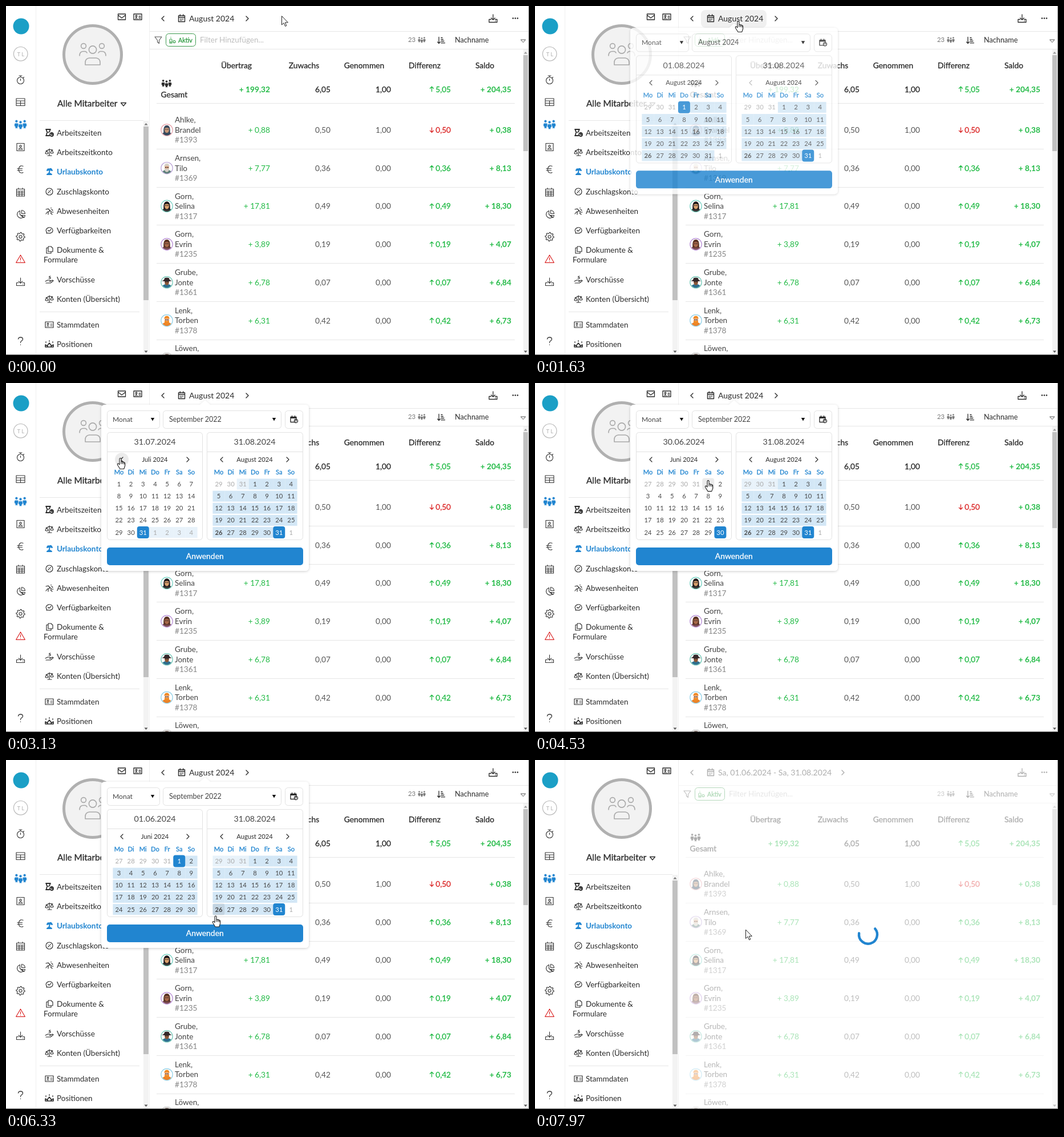
An HTML page for the animation above (8000 ms loop, 917x611 px).

```html
<!DOCTYPE html>
<html lang="de">
<head>
<meta charset="utf-8">
<title>Urlaubskonto</title>
<style>
html, body { margin: 0; width: 100%; height: 100%; overflow: hidden; background: #fff; }
svg { display: block; width: 917px; height: 611px; font-family: Lato, "Open Sans", sans-serif; }
text { white-space: pre; }
</style>
</head>
<body>
<svg id="stage" viewBox="0 0 917 611"></svg>
<script>
const BLUE = '#2185d0', GREEN = '#21ba45', RED = '#db2828', INK = '#2b2b2b', LINE = '#3a3a3a';

// ---- drawing helpers (return SVG markup) ----
function text(x, y, str, size, fill = INK, o = {}) {
  const medium = o.medium ? ` stroke="${fill}" stroke-width=".3"` : '';
  return `<text x="${x}" y="${y}" font-size="${size}" fill="${fill}" font-weight="${o.bold ? 700 : 400}" text-anchor="${o.anchor || 'start'}"${medium}>${str}</text>`;
}
const rect = (x, y, w, h, fill, rx = 0, stroke = 'none') =>
  `<rect x="${x}" y="${y}" width="${w}" height="${h}" rx="${rx}" fill="${fill}" stroke="${stroke}"/>`;
const circle = (x, y, r, fill, stroke = 'none', w = 1) =>
  `<circle cx="${x}" cy="${y}" r="${r}" fill="${fill}" stroke="${stroke}" stroke-width="${w}"/>`;
const icon = (x, y, d, color = LINE, w = 1.15, fill = 'none') =>
  `<path transform="translate(${x} ${y})" d="${d}" fill="${fill}" stroke="${color}" stroke-width="${w}" stroke-linecap="round" stroke-linejoin="round"/>`;
const solid = (x, y, d, color = INK) => icon(x, y, d, 'none', 0, color);
const hline = (x1, x2, y, color = '#e6e6e6') => rect(x1, y, x2 - x1, 1, color);
const group = (id, body, extra = '') => `<g id="${id}" ${extra}>${body}</g>`;
const ring = r => `M${-r} 0A${r} ${r} 0 1 1 ${r} 0A${r} ${r} 0 1 1 ${-r} 0Z`;

const CARD = 'M-7 -5H7V5H-7ZM-4 3Q-3 0 -1 3M2 -1H5M2 2H5' + 'M-3.8 -1.5A1.2 1.2 0 1 1 -1.2 -1.5A1.2 1.2 0 1 1 -3.8 -1.5Z';
const ENVELOPE = 'M-6.5 -5H6.5V5H-6.5ZM-6.5 -3L0 2L6.5 -3';
const GRID = 'M-7.5 -6H7.5V6.5H-7.5ZM-7.5 -2H7.5M-7.5 2.2H7.5M0 -2V6.5';
const DOWNLOAD = 'M0 -7V2M-3.3 -1L0 2.3L3.3 -1M-3.5 1.5H-7V6.5H7V1.5H3.5M4 4.2H4.5';
const CALENDAR = 'M-5.5 -4.5H5.5V6H-5.5ZM-5.5 -1.5H5.5M-2.7 -6.5V-4M2.7 -6.5V-4M-2.5 1.5H-2M0 1.5H.3M2 1.5H2.5M-2.5 3.8H-2M0 3.8H.3';
const SCALES = 'M-6 -2L0 -5L6 -4M0 -6V6M-3 6H4M-7 2L-4.5 -3L-2 2Q-4.5 4 -7 2ZM2 1L4.5 -4L7 1Q4.5 3 2 1Z';
const DROP = 'M-4.5 -2.5H4.5L0 3Z', CARET = 'M-3.2 -2.5H3.2L0 3Z';
const LEFT = 'M2 -4L-2 0L2 4', RIGHT = 'M-2 -4L2 0L-2 4';

// three standing figures, the middle one in front
function people(x, y, color, s = 1) {
  const one = (dx, dy) => `<g transform="translate(${dx} ${dy})"><circle cy="-4.8" r="2.2"/>`
    + `<path d="M-1.5 -2H1.5Q3.3 -2 3.3 0V2.2Q3.3 3.2 2 3.4V6H-2V3.4Q-3.3 3.2 -3.3 2.2V0Q-3.3 -2 -1.5 -2Z"/></g>`;
  return `<g transform="translate(${x} ${y}) scale(${s})" fill="${color}" stroke="#fff" stroke-width=".7">${one(-6.2, -.6)}${one(6.2, -.6)}${one(0, .8)}</g>`;
}

// ---- left rail and sidebar ----
function rail() {
  let gear = '';
  for (let i = 0; i < 32; i++) {
    const r = i % 4 < 2 ? 7.6 : 5.8, a = i / 32 * 2 * Math.PI;
    gear += (i ? 'L' : 'M') + (r * Math.cos(a)).toFixed(1) + ' ' + (r * Math.sin(a)).toFixed(1);
  }
  return rect(52, 0, 1, 611, '#f0f0f0') + circle(26.5, 35.5, 14, '#1b9fc6')
    + circle(25.7, 83.8, 12.3, '#fff', '#b9b9b9', 1.2) + text(25.7, 87.5, 'T L', 9.5, '#b4b4b4', { anchor: 'middle' })
    + icon(25.5, 130.5, ring(6) + 'M0 -3V0M-2.5 -8.5H2.5M0 -8V-6M5 -5L6 -6')
    + icon(25.5, 168, GRID) + people(25.5, 208, BLUE, 1.15)
    + icon(25.5, 247, 'M-6.5 -6.5H6.5V6.5H-6.5ZM-3.5 4Q0 -1 3.5 4ZM-1.7 -1.7A1.7 1.7 0 1 1 1.7 -1.7A1.7 1.7 0 1 1 -1.7 -1.7Z')
    + icon(25.5, 286, 'M4.5 -5.5Q-1 -8 -3 -2Q-4 3 -1 5.5Q2 7 4.5 5.5M-5.5 -1.5H3M-5.5 1.5H3')
    + icon(25.5, 326, 'M-7 -5.5H7V7H-7ZM-7 -2H7M-7 1H7M-7 4H7M-2.5 -2V7M2.5 -2V7M-3.5 -7.5V-5.5M3.5 -7.5V-5.5')
    + icon(25.5, 365, 'M-1 -6.5A6.5 6.5 0 1 0 4.5 5L-1 0ZM2 -7.5A7 7 0 0 1 8 -1.5H2ZM2 1.5H8A7 7 0 0 1 6 5.5Z')
    + icon(25.5, 404, gear + 'Z') + icon(25.5, 404, ring(2.5))
    + icon(25.5, 443, 'M0 -7L7.8 6.3H-7.8ZM0 -2.5V1.5M0 3.9V4', RED, 1.2)
    + icon(25.5, 483, DOWNLOAD)
    + icon(25.5, 587, 'M-4 -4Q-3.5 -7 0 -7Q4 -7 4 -3.7Q4 -1.8 1.8 -.7Q0 .3 0 2.5M0 6V6.2', LINE, 1.3);
}

const MENU = [
  [222, 'Arbeitszeiten', 'M-6 -6H2M-6 5H0M-5 -6V-4Q-5 -2 -3 -1Q-5 0 -5 5M1 -6V-4Q1 -2 -1 -1M1 3A3 3 0 1 1 7 3A3 3 0 1 1 1 3ZM4 1.5V3H5', 1.8],
  [256, 'Arbeitszeitkonto', SCALES],
  [290, 'Urlaubskonto', 'M-4 -2Q-3 -6 0 -4Q3 -7 5 -2L0 -3.5ZM0 -3.5Q1 1 -1 3M-4 5H4Q0 1 -4 5Z', 2],
  [325, 'Zuschlagskonto', ring(6) + 'M-2.3 2.3L2.3 -2.3M-2 -2H-1.8M2 2H1.8'],
  [359, 'Abwesenheiten', 'M-6 -3L-2 -4L1 -1L-2 2V6M1 -1L4 2H7M-3 1L-6 5M3 -6V-5M4 -3L6 -1M2 3L5 6'],
  [393, 'Verfügbarkeiten', 'M-5 5L-4.5 3A6 5 0 1 1 -2 4.5ZM-2.5 -.5L-.5 1.3L3 -2'],
  [427, 'Dokumente &amp;', 'M-2 -6H3L6 -3V3H-2ZM-2 -3.5H-5V6H3V3'],
  [479, 'Vorschüsse', 'M-7 3L-3 1H1Q3 3 0 3.5M-6 6H2L7 2Q5 0 2 3M2 -6Q-1 -6 0 -4Q3 -4 2 -2H-1'],
  [513, 'Konten (Übersicht)', SCALES],
  [558, 'Stammdaten', CARD],
  [592, 'Positionen', 'M-6 -4V-3M0 -6V-5M6 -4V-3M-7 5V1L-4 3L0 -2L4 3L7 1V5ZM-3 5V3M3 5V3', 1.6]
];

function sidebar() {
  const grey = '#a9a9a9';
  let s = icon(203, 19, ENVELOPE, INK, 1.3) + icon(231, 19, CARD, INK, 1.3)
    + circle(152, 85, 50.5, '#f2f2f2', '#b0b0b0', 5)
    + circle(152, 76.5, 6.6, 'none', grey, 1.6)
    + icon(152, 85, 'M-13 18V14Q-13 7 -6 6H6Q13 7 13 14V18Z', grey, 1.6)
    + [-1, 1].map(k => circle(152 + 16 * k, 70, 4.4, 'none', grey, 1.6)
      + icon(152, 85, `M${23 * k} 2Q${23 * k} -5 ${17 * k} -5.5H${13 * k}Q${11 * k} -5 ${10 * k} -3`, grey, 1.6)).join('')
    + text(90, 176, 'Alle Mitarbeiter', 15.3, INK, { medium: 1 })
    + icon(206, 172, DROP, INK, 1.3)
    + hline(59, 241, 200);
  for (const [y, label, d, w] of MENU) {
    const on = label === 'Urlaubskonto', c = on ? BLUE : INK;
    s += icon(76, y, d, c, w || 1.15) + text(89, y + 5, label, 13.5, c, { bold: on });
  }
  return s + text(66, 449, 'Formulare', 13.5) + hline(59, 234, 535)
    + rect(241, 201, 9, 409, '#f3f3f3') + rect(241, 211, 9, 304, '#c1c1c1')
    + solid(245.5, 207, 'M-3 1.5H3L0 -2Z', '#777') + solid(245.5, 605, 'M-3 -1.5H3L0 2Z', '#555')
    + rect(251, 0, 1, 611, '#f0f0f0');
}

// ---- table ----
const STAFF = [
  ['Ahlke,', 'Brandel', 1393, '0,88', '0,50', '1,00', '-0,50', '0,38'],
  ['Arnsen,', 'Tilo', 1369, '7,77', '0,36', '0,00', '0,36', '8,13'],
  ['Gorn,', 'Selina', 1317, '17,81', '0,49', '0,00', '0,49', '18,30'],
  ['Gorn,', 'Evrin', 1235, '3,89', '0,19', '0,00', '0,19', '4,07'],
  ['Grube,', 'Jonte', 1361, '6,78', '0,07', '0,00', '0,07', '6,84'],
  ['Lenk,', 'Torben', 1378, '6,31', '0,42', '0,00', '0,42', '6,73'],
  ['Löwen,', '', '', '', '', '', '', '']
];
// ring, hair, skin, clothes, style
const FACES = [
  ['#e8a0a8', '#3c4a5c', '#c99878', '#34495e', 'long'],
  ['#b9a3d6', '#d5d0c6', '#e0ac8a', '#5d7f7a', 'beard'],
  ['#6fd0c0', '#1f1a1c', '#d9a06c', '#3a3a3a', 'long'],
  ['#b58ad6', '#5a3325', '#a8694a', '#7a4a52', 'long'],
  ['#6fc7b5', '#33282a', '#8a5638', '#2d6f8e', 'hat'],
  ['#8fd0e8', '#f08a24', '#e8b088', '#e9812a', 'beard'],
  ['#c9c9c9', '#4a3026', '#8a5a3c', '#555', 'hat']
];

function face(y, [edge, hair, skin, cloth, style]) {
  let s = circle(282, y, 10.2, '#fff', edge, 1.2) + solid(282, y, 'M-7.5 6Q-5 3 0 3T7.5 6Q4 9.7 0 9.7T-7.5 6Z', cloth);
  if (style === 'long') s += solid(282, y, 'M-5.5 6Q-7 -8 0 -8T5.5 6Z', hair);
  s += solid(282, y, 'M-3.8 -3Q-4 -6 0 -6T3.8 -3V1Q3 5 0 5T-3.8 1Z', skin);
  if (style === 'beard') s += solid(282, y, 'M-4.2 0Q0 2 4.2 0Q4 7 0 7T-4.2 0Z', hair);
  s += style === 'hat' ? solid(282, y, 'M-9 -2.5Q-4 -3.5 -4 -7.5Q0 -9 4 -7.5Q4 -3.5 9 -2.5Q0 -.5 -9 -2.5Z', hair)
    : solid(282, y, 'M-4.5 -2.5Q-4.5 -8 0 -8T4.5 -2.5Q0 -5.5 -4.5 -2.5Z', hair);
  return s + icon(282, y, 'M-2.4 -1H-1M1 -1H2.4', '#2a2226', 1.2);
}

function values(y, [carry, gain, used, diff, saldo], bold) {
  const down = diff[0] === '-', c = down ? RED : GREEN, end = { anchor: 'end' }, strong = { anchor: 'end', bold: 1 };
  const mid = bold ? { anchor: 'end', medium: 1 } : end, grey = bold ? INK : '#555';
  return text(463, y + 5, '+ ' + carry, 13.7, GREEN, bold ? strong : end)
    + text(569, y + 5, gain, 13.7, grey, mid) + text(675, y + 5, used, 13.7, grey, mid)
    + text(780, y + 5, diff.replace('-', ''), 13.6, c, { anchor: 'end', medium: 1 })
    + icon(746.5, y, down ? 'M0 -4.2V4.2M-3 1.2L0 4.2L3 1.2' : 'M0 4.2V-4.2M-3 -1.2L0 -4.2L3 -1.2', c, 1.3)
    + text(886, y + 5, '+ ' + saldo, 13.7, GREEN, strong);
}

function main() {
  let s = group('pill', rect(291, 7, 115, 31, '#f0f0f0', 8))
    + icon(275, 22, LEFT, INK, 1.4) + icon(308, 21.5, CALENDAR, INK, 1.4)
    + group('titleMonth', text(321, 26.8, 'August 2024', 14) + icon(423, 22, RIGHT, INK, 1.4))
    + group('titleRange', text(321, 26.8, 'Sa, 01.06.2024 - Sa, 31.08.2024', 14.1) + icon(540, 22, RIGHT, INK, 1.4))
    + icon(854, 22, DOWNLOAD, INK, 1.3) + [-4, 0, 4].map(d => circle(893 + d, 21.5, 1.3, INK)).join('')
    + hline(252, 917, 44)
    + icon(267, 59.5, 'M-6 -5.5H6L1.5 .5V6L-1.5 3.5V.5Z', '#555', 1.1)
    + rect(280.5, 48.5, 52, 22, '#fff', 5, '#3c9a4e')
    + icon(292, 60, 'M-3 -5.5V-5M-5 5V-1Q-3 -4 -1 -1V5ZM-3 2V5M1 2.5A2 2 0 1 1 5 2.5A2 2 0 1 1 1 2.5Z', '#2c9a40', 1.1)
    + text(302, 63.5, 'Aktiv', 10.7, '#2c9a40', { medium: 1 })
    + text(340, 64.3, 'Filter Hinzufügen...', 13.5, '#bdbdbd')
    + text(705, 63.3, '23', 11.3, '#777') + people(729, 59.5, '#777', .72)
    + icon(763, 60, 'M-4 -5.5V5.5M-6.3 3L-4 5.5L-1.7 3M0 -4.5H2M0 -1.5H3.5M0 1.5H5M0 4.7H6.5', INK, 1.3)
    + text(787, 64, 'Nachname', 12.7) + icon(907, 61, 'M-4 -2H4L0 2.5Z', '#555', 1)
    + hline(252, 917, 75);
  const heads = { 'Übertrag': 404, 'Zuwachs': 522.5, 'Genommen': 628, 'Differenz': 734, 'Saldo': 839.5 };
  for (const h in heads) s += text(heads[h], 109, h, 13.8, INK, { anchor: 'middle', medium: 1 });
  s += people(281.5, 136, INK, .95) + text(271.5, 160, 'Gesamt', 13.9, INK, { medium: 1 })
    + values(145.5, ['199,32', '6,05', '1,00', '5,05', '204,35'], true) + hline(264, 892, 170);
  STAFF.forEach(([last, first, no, ...nums], i) => {
    const y = 217 + 66.7 * i;
    s += text(296, y - 12.8, last, 13.5, '#444') + face(y, FACES[i]);
    if (!first) return;
    s += text(296, y + 4.8, first, 13.5, '#444') + text(296, y + 22.3, '#' + no, 13.6, '#858585')
      + values(y, nums) + hline(264, 892, Math.round(y + 33));
  });
  return s + rect(907, 76, 9, 535, '#f3f3f3') + rect(907, 86, 8, 168, '#c1c1c1')
    + solid(911, 82, 'M-3 1.5H3L0 -2Z', '#999') + solid(911, 605, 'M-3 -1.5H3L0 2Z', '#555');
}

// ---- date range popup ----
const MONTHS = ['Juni', 'Juli', 'August'], STEP = 21.15;
const day = (m, d) => Math.round(Date.UTC(2024, m - 1, d) / 864e5);

function monthView(x0, month, from, picked, locked) {
  const mid = { anchor: 'middle' }, cx = x0 + 63, to = day(8, 31);
  const date = new Date(picked * 864e5).toISOString().slice(0, 10).split('-').reverse().join('.');
  let s = text(cx, 108.3, date, 14.3, '#444', mid) + text(cx, 138, MONTHS[month - 6] + ' 2024', 11.2, INK, mid)
    + icon(cx - 58, 134, LEFT, locked ? '#aaa' : INK, 1.2) + icon(cx + 58, 134, RIGHT, INK, 1.2);
  ['Mo', 'Di', 'Mi', 'Do', 'Fr', 'Sa', 'So'].forEach((w, i) => s += text(x0 + STEP * i, 160, w, 11.2, BLUE, { anchor: 'middle', medium: 1 }));
  const first = day(month, 1), start = first - (first + 3) % 7, last = day(month + 1, 1) - 1;
  let labels = '';
  for (let i = 0; i < 35; i++) {
    const n = start + i, x = x0 + STEP * (i % 7), y = 177 + STEP * Math.floor(i / 7);
    const outside = n < first || n > last, on = n === picked;
    if (n >= from && n <= to && !on) s += rect(x - 10.6, y - 9.5, 21.3, 19, outside ? '#e8f2fa' : '#d3e7f6');
    if (on) labels += rect(x - 10.5, y - 10.5, 21, 21, BLUE, 4);
    labels += text(x, y + 4, new Date(n * 864e5).getUTCDate(), 11.3, on ? '#fff' : outside ? '#aaa' : '#484848',
      { anchor: 'middle', bold: n === day(8, 26) });
  }
  return s + labels;
}

// time, month, first day of the range
const VIEWS = [[0, 8, 1], [3130, 7, 31], [3600, 6, 30], [5170, 6, 1]];

function popup() {
  const edge = '#e2e2e2';
  const box = (x, y, w, h) => rect(x, y, w, h, '#fff', 5, edge);
  let s = `<g filter="url(#shadow)">${rect(167, 38, 364, 291, '#fff', 6)}<path d="M340 38.5L349 30L358 38.5Z" fill="#fff"/></g>`
    + group('selects', box(177.5, 48.5, 92, 31) + text(187, 68, 'Monat', 12.1, '#444') + solid(257, 63.5, CARET, '#111')
      + box(275.5, 48.5, 207, 31) + solid(470, 63.5, CARET, '#111')
      + group('optOld', text(286, 68, 'August 2024', 12.6, '#444')) + group('optNew', text(286, 68, 'September 2022', 12.5, '#444'))
      + box(489.5, 48.5, 31, 31) + icon(504.5, 64, 'M1 4.5H-5.5V-4.5H4.5V-1M-3 -6.5V-4.5M2 -6.5V-4.5M1 2.5A3 3 0 1 1 7 2.5A3 3 0 1 1 1 2.5ZM4 1V2.7', INK, 1.4)
      + rect(499, 59.5, 10, 2.5, INK))
    + group('selectAny', box(177.5, 48.5, 343, 31) + text(187, 68, 'Beliebig', 12.2, '#444') + solid(501, 63.5, CARET, '#111'))
    + box(177.5, 86.5, 167, 188) + box(352.5, 86.5, 168, 188) + hline(178, 344, 120, edge) + hline(353, 520, 120, edge);
  VIEWS.forEach(([, m, d], i) => {
    const from = day(m, d);
    s += group('view' + i, monthView(198, m, from, from) + monthView(373, 8, from, day(8, 31), i === 0));
  });
  return s + group('hoverCell', rect(-10.5, -10.5, 21, 21, '#000', 4), 'opacity=".08"')
    + group('hoverPrev', circle(203, 134, 12, '#000'), 'opacity=".08"')
    + rect(177, 288, 344, 31, BLUE, 5) + group('hoverApply', rect(177, 288, 344, 31, '#1e7ec8', 5))
    + text(348.8, 308.4, 'Anwenden', 13.9, '#fff', { anchor: 'middle', medium: 1 });
}

const ARROW = 'M.5 .5V15.5L4 12.2L6.6 18L8.8 17L6.4 11.4H11Z';
const HAND = 'M-1 1.7Q.5 -.7 2 1.7V7Q3.5 6 4.6 7.4Q6.2 6.6 7 8.2Q8.6 7.8 8.6 9.8V14L6.7 19.5H0L-4 13.2Q-5.4 10.7 -3.8 10.1Q-2.4 9.8 -1 12ZM2 7V10.5M4.6 7.5V10.5M7 8.5V11';

document.getElementById('stage').innerHTML =
  '<defs><filter id="shadow" x="-5%" y="-5%" width="110%" height="112%"><feDropShadow dx="0" dy="1" stdDeviation="2.2" flood-color="#000" flood-opacity=".2"/></filter></defs>'
  + rail() + sidebar() + main() + group('popup', popup())
  + group('veil', rect(252, 0, 665, 611, '#fff'))
  + `<path id="spinner" fill="none" stroke="${BLUE}" stroke-width="4.4" stroke-linecap="round"/>`
  + rect(0, 610, 917, 1, '#6b6b6b') + rect(916, 0, 1, 611, '#8a8a8a')
  + group('cursor', group('arrow', icon(0, 0, ARROW, '#222', 1, '#fff')) + group('hand', icon(0, 0, HAND, '#222', 1.1, '#fff')));

// ---- motion ----
const $ = id => document.getElementById(id);
const show = (id, on) => $(id).setAttribute('display', on ? 'inline' : 'none');
const fade = (id, v) => $(id).setAttribute('opacity', v);
const ramp = (t, a, b) => Math.min(1, Math.max(0, (t - a) / (b - a)));
const inOut = p => p * p * (3 - 2 * p), out = p => 1 - (1 - p) ** 2, linear = p => p;

// time, x, y, easing towards this point
const PATH = [
  [230, 483, 17.5], [1030, 356, 26, inOut], [2130, 356, 26], [2900, 200, 131, inOut],
  [4070, 200, 131], [4530, 303, 170, inOut], [4630, 308, 173, out], [4770, 308, 173],
  [4970, 306, 174, linear], [5930, 306, 174], [6330, 367, 272.5, inOut], [6730, 369, 297, inOut]
];

function pointer(t) {
  let a = PATH[0];
  for (const b of PATH) {
    if (t < b[0]) {
      const p = (b[3] || linear)(ramp(t, a[0], b[0]));
      return [a[1] + (b[1] - a[1]) * p, a[2] + (b[2] - a[2]) * p];
    }
    a = b;
  }
  return [a[1], a[2]];
}

function hoveredCell(x, y) {
  const x0 = x < 350 ? 198 : 373;
  const col = Math.floor((x - x0) / STEP + .5), row = Math.min(4, Math.floor((y - 177) / STEP + .5));
  return col >= 0 && col < 7 && row >= 0 && y < 274 ? [x0 + col * STEP, 177 + row * STEP] : null;
}

function arc(cx, cy, r, from, sweep) {
  const at = deg => {
    const a = deg * Math.PI / 180;
    return `${(cx + r * Math.cos(a)).toFixed(2)} ${(cy + r * Math.sin(a)).toFixed(2)}`;
  };
  return `M${at(from)}A${r} ${r} 0 ${sweep > 180 ? 1 : 0} 1 ${at(from + sweep)}`;
}

function draw(t) {
  const [x, y] = pointer(t), open = t > 1430 && t < 6830;
  const cell = open && hoveredCell(x, y);
  const prev = open && Math.hypot(x - 203, y - 134) < 12;
  const apply = open && y > 288 && x < 521 && x > 177;
  const onTitle = y < 38 && x > 291 && x < 406;

  $('cursor').setAttribute('transform', `translate(${x.toFixed(1)} ${y.toFixed(1)})`);
  const hand = cell || prev || apply || onTitle;
  show('hand', hand);
  show('arrow', !hand);
  fade('pill', ramp(t, 1000, 1200) * (1 - ramp(t, 2280, 2450)));

  const o = t < 6830 ? out(ramp(t, 1430, 1780)) : 1 - ramp(t, 6830, 7110);
  show('popup', o > 0);
  fade('popup', o);
  $('popup').setAttribute('transform', `translate(0 ${(11 * (1 - o) ** 2).toFixed(2)})`);
  VIEWS.forEach(([at], i) => show('view' + i, t >= at && !(i < 3 && t >= VIEWS[i + 1][0])));
  show('optOld', t < 3130);
  show('optNew', t >= 3130);
  show('selects', t < 6800);
  show('selectAny', t >= 6800);
  show('hoverCell', cell);
  if (cell) $('hoverCell').setAttribute('transform', `translate(${cell})`);
  show('hoverPrev', prev);
  fade('hoverApply', ramp(t, 6680, 6780));

  show('titleMonth', t < 6830);
  show('titleRange', t >= 6830);
  fade('veil', .62 * ramp(t, 6830, 7030));

  // the arc grows while it turns
  const sweep = .217 * (t - 6918);
  show('spinner', sweep > 0);
  if (sweep > 0) $('spinner').setAttribute('d', arc(584, 305.7, 16, 47 + .303 * (t - 7070), sweep));
}

const begin = performance.now();
function tick() {
  draw((performance.now() - begin) % 8000);
  requestAnimationFrame(tick);
}
tick();
</script>
</body>
</html>
```
